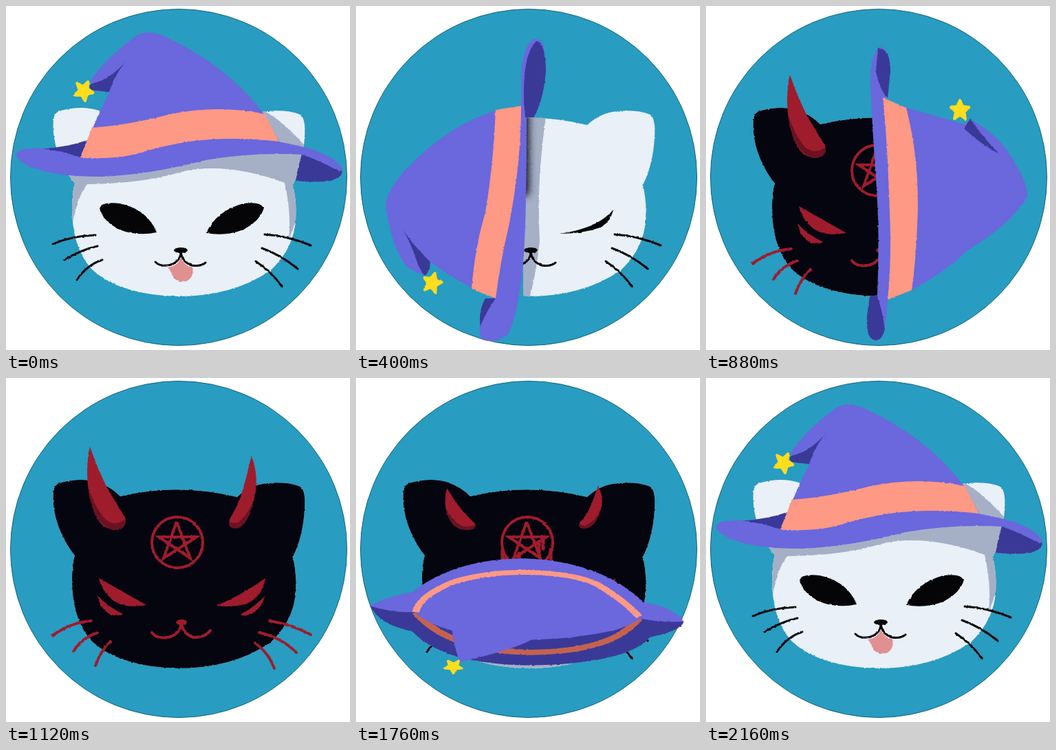
An HTML page that plays this animation: 500 px wide and 500 px high, repeating every 2400 ms.

```html
<!DOCTYPE html>
<html lang="en">
<head>
<meta charset="utf-8">
<title>Cat and hat</title>
<style>
  html, body { margin: 0; height: 100%; overflow: hidden; background: #fff; }
  svg { display: block; width: 100vw; height: 100vh; }
  .p { fill: #6b67dd; }
  .d { fill: #3a3998; }
  .b { fill: #fd9985; }
  .g { fill: #a5b0c6; }
  .star { fill: #fddd1c; stroke: #fddd1c; stroke-width: 4; stroke-linejoin: round; }
  .line { fill: none; stroke-width: 3; stroke-linecap: round; }
  .ink { fill: none; stroke: #9f1c2d; stroke-width: 4; }
</style>
</head>
<body>
<svg viewBox="0 0 500 500">
  <defs>
    <filter id="rough" filterUnits="userSpaceOnUse" x="0" y="0" width="500" height="500" color-interpolation-filters="sRGB">
      <feTurbulence type="fractalNoise" baseFrequency=".25" numOctaves="2" seed="4"/>
      <feDisplacementMap in="SourceGraphic" scale="2.5" xChannelSelector="R" yChannelSelector="G"/>
    </filter>
    <filter id="soft" filterUnits="userSpaceOnUse" x="-50" y="-50" width="600" height="600">
      <feGaussianBlur stdDeviation="6"/>
    </filter>
    <path id="head" d="M100 258C78 230 66 195 69 165Q70 154 80 152Q110 144 135 152Q155 160 166 172Q250 152 336 173Q355 155 380 153Q410 150 428 158Q436 165 434 190Q432 230 417 260Q424 290 420 320Q415 355 385 384Q330 422 250 422Q165 420 125 383Q95 350 96 290Q96 270 100 258Z"/>
    <clipPath id="inHead"><use href="#head"/></clipPath>
    <clipPath id="outsideHat"><path id="brimSide"/></clipPath>
    <rect id="edge" filter="url(#soft)"/>
    <mask id="dark" maskUnits="userSpaceOnUse" x="0" y="0" width="500" height="500"><use href="#edge" fill="#fff"/></mask>
    <mask id="light" maskUnits="userSpaceOnUse" x="0" y="0" width="500" height="500">
      <rect width="500" height="500" fill="#fff"/><use href="#edge" fill="#000"/>
    </mask>
    <path id="star" class="star" d="M0-14L4-5 13-4 6 3 8 13 0 7-8 13-6 3-13-4-4-5Z"/>

    <!-- hat upright -->
    <g id="h0">
      <path class="d" d="M50 208Q90 205 118 195L108 222Q80 214 50 208ZM430 215Q424 235 421 254Q450 257 472 254Q492 247 488 238Q470 222 430 215Z"/>
      <path class="p" d="M108 220L127 175Q140 145 152 122L122 110Q145 75 190 43Q207 33 232 45Q320 85 375 157L398 198Z"/>
      <path class="d" d="M178 77Q160 95 150 125Q140 124 124 122Q118 115 127 112Q150 108 178 77Z"/>
      <path class="b" d="M125 177Q180 173 240 157Q310 143 376 157L397 197Q340 191 300 194Q240 200 190 216Q150 224 108 220Z"/>
      <path class="p" d="M15 215Q20 205 50 207Q80 210 108 220Q150 224 190 215Q250 196 300 194Q360 192 400 198Q470 210 488 234Q491 243 480 238Q450 222 430 216Q360 212 290 224Q210 245 140 248Q60 248 28 230Q14 222 15 215Z"/>
      <use href="#star" transform="translate(113 124) rotate(172)"/>
    </g>
    <path id="s0" class="g" d="M80 240L95 325Q104 275 118 259Q200 258 255 241Q320 226 405 257Q415 300 411 340L440 260L436 205Q400 165 376 153L330 150L200 200Z"/>

    <!-- tip to the left -->
    <g id="h1">
      <path class="p" d="M240 145Q150 155 70 240Q45 270 43 288Q50 350 75 380L98 392L108 372Q135 392 170 411L203 425Z"/>
      <path class="d" d="M68 325Q85 350 108 372Q108 385 100 392Q93 385 88 370Q80 345 68 325ZM188 425H206L182 476Q176 445 188 425Z"/>
      <path class="b" d="M203 151L240 145Q243 240 222 330Q210 385 203 425L168 411Q173 350 188 300Q200 230 203 151Z"/>
      <path class="p" d="M240 145L240 110Q241 58 258 48Q270 46 274 62L248 160Q248 300 244 360Q238 440 222 475Q205 492 183 485Q177 470 182 462Q192 440 203 425Q210 370 222 320Q240 230 240 145Z"/>
      <path class="d" d="M244 140Q242 70 262 51Q276 54 276 95Q272 140 258 162L246 162Z"/>
      <use href="#star" transform="translate(111 402) rotate(15)"/>
    </g>
    <path id="s1" class="g" d="M240 150L276 160Q262 260 267 340Q262 390 252 425H230Z"/>

    <!-- tip down -->
    <g id="h2">
      <path class="p" d="M100 265Q110 360 148 425Q168 460 190 469Q240 475 295 472L292 462L278 443L362 399L240 320Z"/>
      <path class="d" d="M232 461Q260 445 280 444Q292 452 294 463Q275 455 232 461ZM30 165Q35 153 50 156Q63 160 70 178L72 208Q45 192 30 165Z"/>
      <path class="p" d="M30 165Q45 190 72 206Q150 250 250 281Q350 317 430 350Q460 370 458 380Q450 400 440 402Q420 390 392 374Q300 325 200 287Q130 255 100 234Q50 208 30 165Z"/>
      <path class="b" d="M100 231Q190 274 250 293Q330 322 397 369Q380 390 362 399Q290 350 200 320Q150 305 100 272Z"/>
      <path class="d" d="M394 371Q412 378 434 399Q408 392 390 378Z"/>
      <use href="#star" transform="translate(307 461) rotate(12)"/>
    </g>

    <!-- tip to the right -->
    <g id="h3">
      <path class="p" d="M288 147L375 172L385 165Q430 190 450 230Q468 260 467 278Q440 320 380 355Q350 385 299 413Z"/>
      <path class="d" d="M375 178L384 164Q398 185 426 215Q398 200 375 178Z"/>
      <path class="p" d="M254 59Q268 66 267 95L262 135Q282 280 264 427Q262 470 252 485Q232 490 234 450Q240 425 249 420Q253 330 247 250Q242 180 239 120Q238 65 254 59Z"/>
      <path class="d" d="M250 62Q268 60 268 95L264 134Q251 120 247 95ZM238 422L248 420Q256 440 260 470Q256 484 250 485Q232 490 234 450Z"/>
      <path class="b" d="M257 133L291 148Q312 230 307 320Q305 370 299 413L264 427Q270 370 267 300Q264 200 257 133Z"/>
      <use href="#star" transform="translate(369 151)"/>
    </g>

    <!-- peeking out from behind -->
    <g id="h4">
      <path class="p" d="M150 352Q80 345 55 351Q45 362 55 373Q85 388 150 384Z"/>
      <path class="d" d="M380 354Q440 345 463 351Q471 362 455 372Q420 380 380 378ZM228 410H276Q274 432 250 433Q235 430 228 418Z"/>
      <use href="#star" transform="translate(261 446) rotate(-12)"/>
    </g>

    <!-- tip towards the viewer -->
    <g id="h5">
      <path class="d" d="M11 248L80 245L250 300L420 265L486 284Q480 305 435 318Q400 378 250 381Q120 378 75 305Q25 290 11 248Z"/>
      <path d="M80 262Q130 350 255 352Q380 350 418 275" fill="none" stroke="#c5624f" stroke-width="12"/>
      <path class="p" d="M75 217Q140 142 245 142Q360 148 425 240Q470 250 486 283Q455 286 420 276Q405 292 380 303Q320 322 255 324Q230 345 147 374Q138 340 135 303Q100 290 78 262Q45 264 11 248Q30 230 75 217Z"/>
      <path d="M80 262Q85 225 140 193Q190 172 250 173Q320 175 355 200Q395 235 418 272" fill="none" stroke="#fd9985" stroke-width="11"/>
      <use href="#star" transform="translate(137 384) rotate(180)"/>
    </g>
    <g id="s5">
      <path class="g" d="M60 300H450V500H60Z"/>
      <path fill="#e9f0f8" d="M212 420Q240 400 265 396L355 387Q340 402 322 412Q270 428 212 420Z"/>
    </g>
  </defs>

  <circle cx="251" cy="249" r="244.5" fill="#299cc1" stroke="#17647d"/>
  <g filter="url(#rough)">
    <use id="back"/>
    <g clip-path="url(#outsideHat)">
      <use id="face" href="#head"/>
      <g clip-path="url(#inHead)"><use id="shade"/></g>

      <g mask="url(#light)" fill="#050507" stroke="#050507" stroke-width="0">
        <g id="awake">
          <path d="M136 294Q140 284 165 287Q205 295 219 329Q190 335 165 325Q140 312 136 294ZM375 293Q370 284 345 287Q305 298 291 330Q320 335 345 325Q370 312 375 293Z"/>
          <path fill="#e09090" d="M235 380Q250 378 254 366Q260 378 271 380Q274 394 262 400Q248 402 243 394Q240 385 235 380Z"/>
        </g>
        <g id="asleep">
          <path id="lid" d="M295 331Q330 326 350 315Q365 307 374 296Q370 314 355 322Q330 331 295 331Z"/>
          <use href="#lid" transform="translate(510) scale(-1 1)"/>
        </g>
        <ellipse cx="254" cy="355" rx="10" ry="4"/>
        <path class="line" d="M217 372Q225 380 240 376Q254 370 254 358Q256 372 270 377Q283 379 290 373M68 346Q95 334 130 333M85 369Q110 354 133 349M103 398Q118 376 140 369M376 332Q410 334 443 348M372 352Q400 362 424 382M363 371Q388 388 401 408"/>
      </g>

      <g mask="url(#dark)" fill="#9f1c2d" stroke="#9f1c2d" stroke-width="0">
        <use href="#head" fill="#05050f"/>
        <path d="M135 291Q160 305 204 330Q168 336 152 320Q138 306 135 291ZM133 316Q147 332 170 343Q165 347 152 344Q137 336 133 316ZM377 291Q372 318 350 328Q330 334 306 331Q345 314 377 291ZM376 317Q362 332 341 344Q346 348 358 342Q373 333 376 317Z"/>
        <ellipse cx="255" cy="355" rx="8" ry="4"/>
        <path class="line" style="stroke-width:4" d="M212 370Q220 381 240 376Q253 370 255 358Q258 372 272 377Q290 377 297 367M68 374Q95 355 124 353M98 397Q110 378 133 370M130 418Q138 395 152 383M383 353Q415 358 443 373M368 370Q400 377 422 399M362 385Q382 400 390 422"/>
        <path class="ink" id="ring" pathLength="1" d="M249 202A37 37 0 0 0 249 276A37 37 0 0 0 249 202"/>
        <path class="ink" id="sign" pathLength="1" d="M248 209L229 262L277 231H222L268 262Z"/>
        <path class="line" id="drips" style="stroke-width:5" d="M213 250V274M218 262V291M253 278V289M276 265V288M283 250V272M237 255V267M266 238V256M272 234V248"/>
      </g>

      <g id="hornL">
        <path fill="#9f1c2d" d="M122 100Q134 135 150 165Q165 190 173 203Q175 215 165 219Q145 224 133 205Q117 175 118 130Q119 110 122 100Z"/>
        <path fill="#6a1222" d="M120 160Q130 190 145 206Q160 217 174 204Q176 222 155 221Q126 212 120 160Z"/>
      </g>
      <g id="hornR">
        <path fill="#9f1c2d" d="M359 94Q368 120 366 150Q362 185 348 208Q340 219 328 217Q322 212 325 203Q335 185 342 165Q352 130 359 94Z"/>
        <path fill="#6a1222" d="M363 165Q355 195 338 208Q327 211 324 205Q322 217 336 219Q356 212 363 165Z"/>
      </g>
    </g>
    <use id="front"/>
  </g>
</svg>
<script>
const LOOP = 2400;
const $ = id => document.getElementById(id);
const all = [-50, -50, 600, 600], none = [0, 0, 0, 0];
const leftOf = x => [-50, -50, x + 50, 600];
const above = y => [-50, -50, 600, y + 50];

// the side of the brim on which the head shows, for poses that swallow the rest
const everywhere = 'M-900-900H1500V1500H-900Z';
const sides = {
  1: 'M243-900H1500V1500H243Z',
  2: 'M-500-23L1000 600V-900H-500Z',
  3: 'M256-900H-900V1500H256Z',
};

// start ms, hat pose, hat transform, dark area, left horn, right horn, sign drawn
const steps = [
  [0, 0, '', none, 0, 0, 0],
  [240, 0, 'translate(0 10) rotate(-30 250 235)', none, 0, 0, 0],
  [320, 1, 'translate(0 -8) rotate(30 243 270)', none, 0, 0, 0],
  [400, 1, '', [-50, 100, 301, 175], 0, 0, 0],
  [480, 1, 'rotate(-28 243 270)', leftOf(257), 0, 0, 0],
  [560, 2, '', leftOf(263), .42, 0, .4],
  [640, 2, 'translate(8) rotate(-28 250 275)', leftOf(310), .65, 0, .65],
  [720, 3, 'rotate(56 250 275)', leftOf(370), .85, 0, .85],
  [800, 3, 'rotate(28 250 275)', all, 1, 0, 1],
  [880, 3, '', all, 1, 0, 1],
  [960, 3, 'translate(85 30) scale(.85)', all, 1, .3, 1],
  [1040, 3, 'translate(90 80) scale(.75)', all, 1, .6, 1],
  [1120, -1, '', all, 1, .85, 1],
  [1200, -1, '', all, 1, 1, 1],
  [1600, 4, '', all, 1, 1, 1],
  [1680, 5, 'translate(18 275) scale(.93 .4)', above(385), .8, .8, 1],
  [1760, 5, 'translate(10 170) scale(.96 .65)', above(350), .5, .5, 1],
  [1840, 5, 'translate(5 80) scale(.98 .85)', above(325), .2, .2, 1],
  [1920, 5, '', [-50, 172, 600, 130], 0, 0, 1],
  [2000, 5, 'translate(0 -35)', none, 0, 0, 0],
  [2080, 0, 'translate(0 36) scale(1 .85)', none, 0, 0, 0],
  [2160, 0, '', none, 0, 0, 0],
];

function set(id, attrs) {
  for (const k in attrs) $(id).setAttribute(k, attrs[k]);
}
const show = (id, on) => set(id, { visibility: on ? 'visible' : 'hidden' });

function grow(id, size, x, y) {
  show(id, size > 0);
  const wide = .58 + .42 * size;
  set(id, { transform: `translate(${x} ${y}) scale(${wide} ${size}) translate(${-x} ${-y})` });
}

function draw(t) {
  const [, pose, transform, [x, y, width, height], left, right, sign] = steps.findLast(s => s[0] <= t);
  const behind = t >= 960 && t < 1680;
  const hat = '#h' + pose;
  set('back', { href: behind ? hat : '#none', transform });
  set('front', { href: behind ? '#none' : hat, transform });
  set('shade', { href: behind ? '#none' : '#s' + pose, transform });
  set('brimSide', { d: !behind && sides[pose] || everywhere, transform });
  set('edge', { x, y, width, height });
  set('face', { fill: t >= 560 && t < 960 ? '#f8f9fc' : '#e9f0f8' });

  const open = t < 240 || t >= 2160;
  show('awake', open);
  show('asleep', !open);
  grow('hornL', left, 173, 221);
  grow('hornR', right, 325, 219);
  set('ring', { 'stroke-dasharray': `${sign} 2` });
  set('sign', { 'stroke-dasharray': `${sign < 1 ? sign * .45 : 1} 2` });
  show('drips', t >= 1440);
}

const begin = performance.now();
function tick() {
  draw((performance.now() - begin) % LOOP);
  requestAnimationFrame(tick);
}
tick();
</script>
</body>
</html>
```
